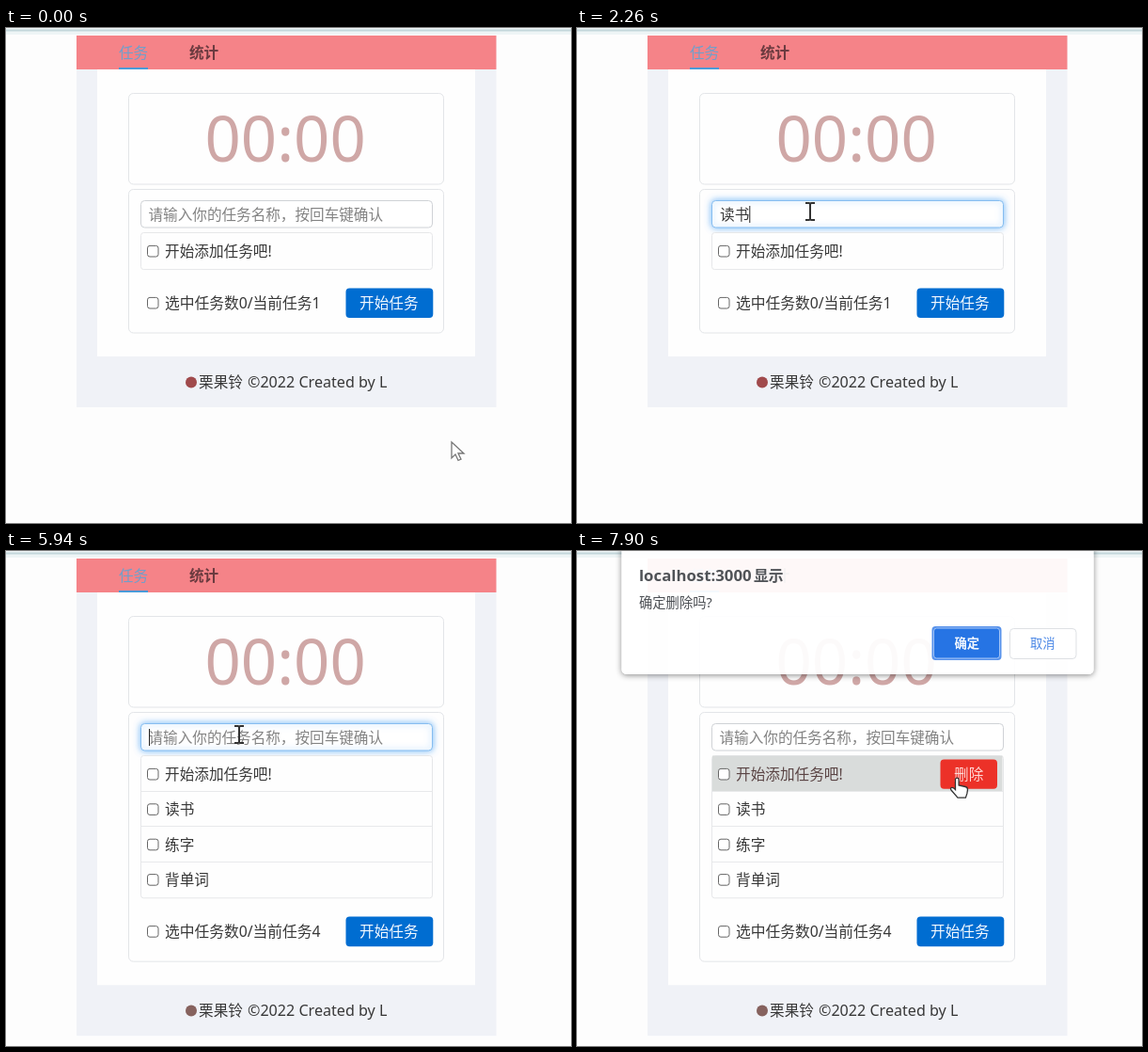
These frames come from a looping animation (601x526 px, 7990 ms). An HTML page with a canvas:

```html
<!DOCTYPE html>
<html lang="zh-CN">
<head>
<meta charset="utf-8">
<style>
html, body { margin: 0; width: 100%; height: 100%; overflow: hidden; background: #fdfdfd; }
canvas { display: block; width: 100%; height: 100%; filter: blur(.45px); }
</style>
</head>
<body>
<canvas id="stage" width="601" height="526"></canvas>
<script>
const ctx = document.getElementById('stage').getContext('2d');
const LOOP = 7990, ROW = 37.4, LIST_TOP = 217.6;
const SANS = '"Noto Sans", "Noto Sans CJK SC", "Noto Sans CJK", sans-serif';
const TASKS = ['开始添加任务吧!', '读书', '练字', '背单词'];

// [time, input text, candidates shown by the input method]
const TYPING = [
  [0, ''],
  [2060, 'd', ['的', '都', '大', '到', '对']],
  [2160, "du'shu", ['读书', '独树', '赌输', '毒树', '度数']],
  [2260, '读书'], [2660, ''],
  [3810, "lian'zi", ['练字', '帘子', '链子', '莲子', '脸子']],
  [3940, '练字'], [4340, ''],
  [4950, '背单词'], [5410, '']
];
const CARET = [[1070, 1600], [2060, 2660], [2730, 3280], [3810, 4340],
  [4810, 5410], [5940, 6470], [7000, 7530]];
const ADDED = [2660, 4340, 5410];

const ARROW = new Path2D('M0 0V17l4-4 3 6.5 3-1.3-3-6.2h6z');
const HAND = new Path2D('M-1.5 9V1a1.8 1.8 0 0 1 3.6 0V7l7 1.5q2.5.6 2.4 3.2l-.6 4-1.5 4.5H1L-6 12q-1.4-2 .8-2.6 1.5-.2 3.7 2.2z');
const BEAM = new Path2D('M-5-9h3.5q1.5 0 1.5 1.5q0-1.5 1.5-1.5H5M0-8V8M-5 9h3.5Q0 9 0 7.5Q0 9 1.5 9H5');

function rect(x, y, w, h, color) {
  ctx.fillStyle = color;
  ctx.fillRect(x, y, w, h);
}

function box(x, y, r, b, radius, fill, stroke) {
  ctx.beginPath();
  ctx.roundRect(x, y, r - x, b - y, radius);
  if (fill) { ctx.fillStyle = fill; ctx.fill(); }
  if (stroke) { ctx.strokeStyle = stroke; ctx.lineWidth = 1; ctx.stroke(); }
}

// y is the middle of the line
function text(str, x, y, color = '#383838', size = 15.65, weight = 400) {
  ctx.font = `${weight} ${size}px ${SANS}`;
  ctx.fillStyle = color;
  ctx.fillText(str, x, y + size * 0.365);
  return ctx.measureText(str).width;
}

function checkbox(y) {
  box(150.5, y - 5.8, 162, y + 5.8, 2.5, '#fff', '#666');
}

// progress in whole steps, as a screen recorder samples it
function stepped(t, from, to, steps) {
  if (t < from) return 0;
  return Math.min(1, (Math.floor((t - from) / (to - from) * (steps - 1) + 1e-6) + 1) / steps);
}

function pointer(t) {
  if (t < 6670) {
    const p = stepped(t, 60, 610, 9), e = p * p * (3 - 2 * p);
    return { x: 474 - 226 * e, y: 440 - 245 * e };
  }
  const p = stepped(t, 6670, 7430, 12), e = p * p * (3 - 2 * p);
  const curve = (a, b, c) => a * (1 - e) ** 2 + 2 * b * e * (1 - e) + c * e * e;
  return { x: curve(248, 300, 404), y: curve(195, 300, 242) };
}

function drawFrame(n) {
  const down = ROW * n;
  rect(0, 0, 601, 526, '#fdfdfd');
  rect(0, 0, 601, 7, '#eef5f6');
  rect(0, 1.5, 601, 2, '#c3d6db');
  rect(75, 8, 446.5, 357.6 + down, '#f0f2f7');
  rect(75, 8, 446.5, 36, '#f58388');
  rect(97, 44, 402, 267.6 + down, '#fefefe');
  text('任务', 120, 26.5, '#6f9fcb', 15.6, 500);
  rect(120, 42, 31, 2, '#4a9ad8');
  text('统计', 195, 26.5, '#6a3a3f', 15.6, 600);
  box(130.5, 69.5, 465.5, 166, 5, '#fefefe', '#e3e5e8');
  text('00:00', 211.5, 118, '#cfa7a6', 67, 500);
  box(130.5, 171.5, 465.5, 286.6 + down, 5, '#fefefe', '#e3e5e8');

  const y = 339 + down;
  ctx.beginPath();
  ctx.arc(197, y, 6, 0, 7);
  ctx.fillStyle = n < 3 ? '#a04a4c' : '#86625e';
  ctx.fill();
  text('栗果铃', 205, y);
  text('©2022 Created by L', 257, y, '#383838', 16.1);
}

function drawInput(t, value, composing) {
  const focus = t < 1070 || t >= 7700 ? 0 : t < 1200 ? 0.5 : 1;
  ctx.save();
  if (focus) {
    ctx.shadowColor = `rgba(70,160,245,${0.75 * focus})`;
    ctx.shadowBlur = 7;
  }
  box(143.5, 183.5, 453.5, 212, 4, '#fff', focus ? '#86bdf0' : '#cfd2d6');
  ctx.restore();
  const w = value ? text(value, 152, 198) : 0;
  if (!value) text('请输入你的任务名称，按回车键确认', 151.5, 198, '#838383', 15.6);
  if (composing) rect(152, 206, w, 1, '#555');
  if (CARET.some(([a, b]) => t >= a && t < b)) rect(152 + w, 189, 1, 18, '#222');
}

function drawList(n, hover) {
  const bottom = 219.2 + ROW * n;
  box(143.5, 217.5, 453.5, bottom, 3, '#fefefe', '#e6e7e9');
  for (let i = 0; i < n; i++) {
    const top = LIST_TOP + ROW * i, mid = top + 19.6;
    if (i === hover) {
      rect(144, top, 308.5, 38, '#d9dcdb');
      box(386.5, mid - 15.8, 447, mid + 15.6, 4, '#ec3128');
      text('删除', 401, mid, '#ffd9d6');
    }
    if (i) rect(144, Math.round(top), 309, 1, '#e8e9eb');
    checkbox(mid);
    text(TASKS[i], 169, mid, i === hover ? '#5a4444' : undefined);
  }
  const mid = 254.8 + ROW * n;
  checkbox(mid);
  text('选中任务数0/当前任务' + n, 169, mid, undefined, 15.75);
  box(361.5, mid - 15.8, 454.3, mid + 15.8, 4, '#006dd1');
  text('开始任务', 376, mid, '#f4f9ff');
}

function drawCandidates(words) {
  ctx.save();
  ctx.shadowColor = 'rgba(0,0,0,.2)';
  ctx.shadowBlur = 4;
  box(153.5, 213.5, 554, 259, 4, '#fafafa', '#d4d4d4');
  ctx.restore();
  rect(158, 227, 3, 18, '#0078d4');
  words.forEach((word, i) => {
    const x = 168 + i * 74;
    text(String(i + 1), x, 236, '#777', 14);
    text(word, x + 16, 236, '#222', 17);
  });
}

function drawCursor({ x, y }, hover) {
  const overInput = x > 143 && x < 454 && y > 183 && y < 213;
  const overButton = hover >= 0 && x > 387 && x < 447;
  ctx.save();
  ctx.translate(x, y);
  ctx.lineWidth = 1.3;
  ctx.strokeStyle = '#333';
  ctx.fillStyle = '#fff';
  if (overInput) {
    ctx.lineWidth = 2;
    ctx.stroke(BEAM);
  } else {
    const shape = overButton ? HAND : ARROW;
    if (!overButton) ctx.strokeStyle = '#777';
    ctx.fill(shape);
    ctx.stroke(shape);
  }
  ctx.restore();
}

function drawDialog(alpha) {
  ctx.save();
  ctx.globalAlpha = alpha;

  // keep the shadow outside, so it does not grey the translucent sheet
  ctx.save();
  ctx.beginPath();
  ctx.rect(0, 0, 601, 526);
  ctx.roundRect(47.5, -8, 502, 139, 5);
  ctx.clip('evenodd');
  ctx.shadowColor = 'rgba(0,0,0,.5)';
  ctx.shadowBlur = 6;
  ctx.shadowOffsetY = 1;
  box(47.5, -8, 549.5, 131, 5, '#fff');
  ctx.restore();

  box(47.5, -8, 549.5, 131, 5, '#fff');
  text('localhost:3000', 66, 26, '#45484d', 16.8, 600);
  text('显示', 188, 26, '#45484d', 15.8, 600);
  text('确定删除吗?', 66, 55, '#404348', 14.3, 500);
  box(377.5, 80, 451.5, 116, 4, '#4c8bea');
  box(379.5, 82, 449.5, 114, 3, '#2473e4', '#a9c8f7');
  text('确定', 401.5, 98.5, '#fff', 13.3, 600);
  box(460.5, 82.5, 531, 114.5, 4, '#fff', '#dcdfe3');
  text('取消', 482, 98.5, '#3f80e4', 13.3, 500);
  ctx.restore();
}

function draw(t) {
  const n = 1 + ADDED.filter(at => t >= at).length;
  const [, value, words] = TYPING.findLast(s => t >= s[0]);
  const cursor = pointer(t);
  const row = Math.floor((cursor.y - LIST_TOP) / ROW);
  const hover = cursor.x > 143 && cursor.x < 454 && row >= 0 && row < n ? row : -1;

  drawFrame(n);
  drawInput(t, value, !!words);
  drawList(n, hover);
  if (words) drawCandidates(words);
  drawCursor(cursor, hover);
  if (t >= 7700) drawDialog(Math.min(1, 0.25 + 0.23 * Math.floor((t - 7700) / 66.6)));
}

const start = performance.now();
function tick() {
  draw((performance.now() - start) % LOOP);
  requestAnimationFrame(tick);
}
tick();
</script>
</body>
</html>
```
